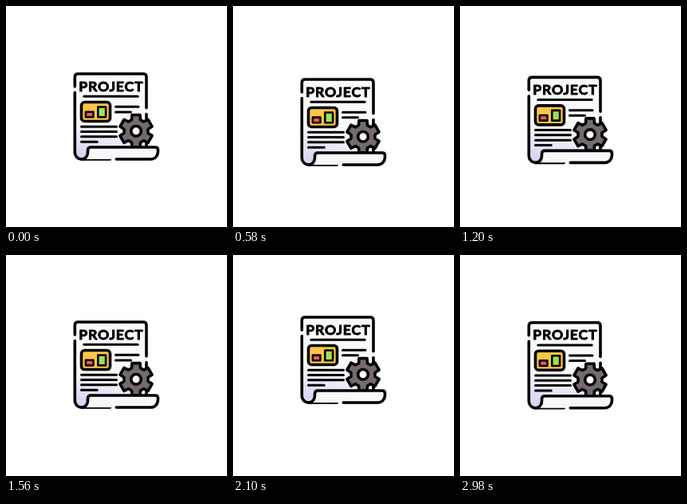
Recreate the animation shown at these times as an HTML page. Size 277 by 277 pixels, loop 3000 ms.

```html
<!DOCTYPE html>
<html lang="en">
<head>
<meta charset="utf-8">
<title>Project sheet</title>
<style>
  html, body { margin: 0; width: 100%; height: 100%; overflow: hidden; background: #fff; }
  svg { display: block; width: 100vw; height: 100vh; }
  .line { fill: none; stroke: #000; stroke-width: 3.6; stroke-linecap: round; stroke-linejoin: round; }
  .thin { stroke-width: 3; }
  .bar { stroke-width: 2.6; }
  text {
    font: 700 17.7px Lato, "Open Sans", sans-serif;
    letter-spacing: .75px;
    text-anchor: middle;
    stroke: #000;
    stroke-width: .9;
    stroke-linejoin: round;
  }
</style>
</head>
<body>
<svg viewBox="0 0 277 277">
  <defs>
    <linearGradient id="paper" x1=".6" y1="0" x2=".4" y2="1">
      <stop offset=".6" stop-color="#fafafa"/>
      <stop offset="1" stop-color="#d9d5f3"/>
    </linearGradient>
  </defs>
  <g id="sheet">
    <!-- page -->
    <path fill="url(#paper)" d="M86.3 89Q86.3 85 90.3 85H172Q176 85 176 89V180H103V184Q102 192 94.5 192Q86.3 191 86.3 183Z"/>
    <path class="line" d="M86.3 101V89Q86.3 85 90.3 85H172Q176 85 176 89V127.8M176 135.5V176"/>
    <path class="line" d="M86.3 108.6V183.5C86.3 188 90 192 94.5 192H130.3"/>

    <text x="131.8" y="106.6">PROJECT</text>
    <path class="line thin" d="M97.8 113.2H165.2M137.5 126.3H166M137.5 132.9H156.5M94.5 151.2H138.5M94.5 157.5H138.5M94.5 163.8H138.5M94.5 170.2H114.3"/>

    <!-- chart -->
    <rect class="line" x="94.5" y="120.5" width="36" height="24" rx="4" style="fill:#ffc547"/>
    <rect class="line bar" x="99.9" y="132.7" width="9.6" height="6.6" style="fill:#fa5560"/>
    <rect class="line bar" x="115.3" y="126.5" width="9.8" height="12.8" style="fill:#a2e04c"/>

    <g transform="translate(163 156.8)">
      <path id="gear" class="line" style="fill:#746a72"/>
      <circle class="line" r="6.3" style="fill:#fff"/>
    </g>

    <!-- curled foot -->
    <path fill="#f8f7fa" d="M94.5 192C99.5 192 102.5 188 102.5 183.5V181Q102.5 177 106.5 177H187Q190.5 177 190.5 180.5V182.5C190.5 187.5 187 192 181.5 192Z"/>
    <path class="line" d="M94.5 192C99.5 192 102.5 188 102.5 183.5V181Q102.5 177 106.5 177H187Q190.5 177 190.5 180.5V182.5C190.5 187.5 187 192 181.5 192H138.3"/>
  </g>
</svg>
<script>
  const LOOP = 3000, SWING = 7.4, TEETH = 6;
  const sheet = document.getElementById("sheet");

  // Each tooth is a trapezoid rising from the rim, given as [radius, degrees off axis].
  function gearPath() {
    const tooth = [[15.2, -21], [20.9, -14], [20.9, 14], [15.2, 21]];
    const points = [];
    for (let i = 0; i < TEETH; i++) {
      for (const [radius, offset] of tooth) {
        const angle = (i * 360 / TEETH - 90 + offset) * Math.PI / 180;
        points.push(`${(radius * Math.cos(angle)).toFixed(2)} ${(radius * Math.sin(angle)).toFixed(2)}`);
      }
    }
    return `M${points.join("L")}Z`;
  }

  function draw(time) {
    const y = SWING * Math.sin(2 * Math.PI * (time % LOOP) / LOOP);
    sheet.setAttribute("transform", `translate(0 ${y.toFixed(3)})`);
  }

  document.getElementById("gear").setAttribute("d", gearPath());
  const start = performance.now();
  function tick() {
    draw(performance.now() - start);
    requestAnimationFrame(tick);
  }
  tick();
</script>
</body>
</html>
```
